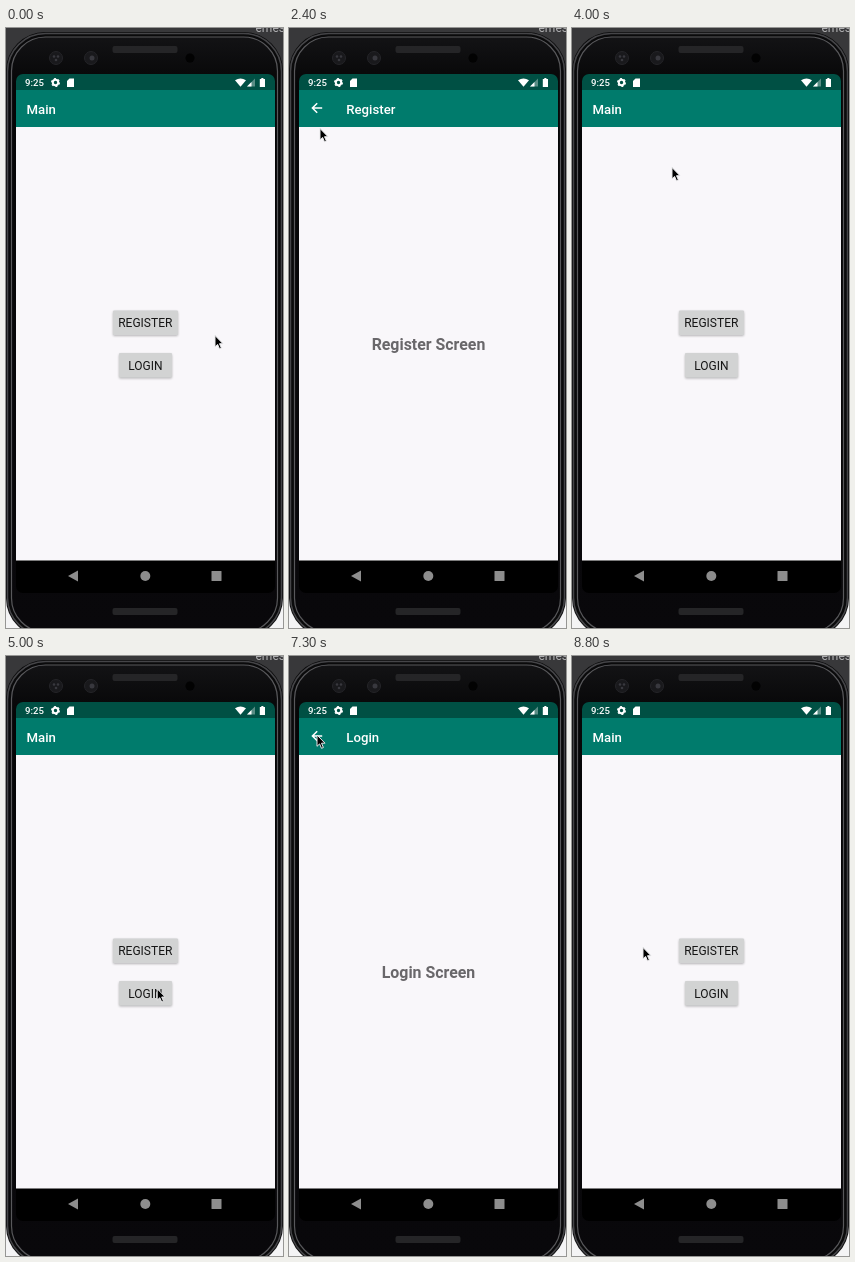
These frames come from a looping animation (277 by 600 pixels, 8900 ms). An HTML page:

```html
<!DOCTYPE html>
<html lang="en">
<head>
<meta charset="utf-8">
<title>Navigation demo</title>
<style>
html, body { margin: 0; width: 100%; height: 100%; overflow: hidden; background: #111; }
svg { display: block; width: 100%; height: 100%; }
text { font-family: Roboto, sans-serif; font-weight: 500; }
.mid { text-anchor: middle; }
.thin { font-weight: 400; }
</style>
</head>
<body>
<svg viewBox="0 0 277 600">
  <defs>
    <linearGradient id="body" x2="0" y2="1">
      <stop offset="0" stop-color="#131315"/>
      <stop offset=".08" stop-color="#060607"/>
      <stop offset="1" stop-color="#09080b"/>
    </linearGradient>
    <filter id="soft" x="-20%" y="-30%" width="140%" height="170%"><feGaussianBlur stdDeviation="1"/></filter>
    <clipPath id="screen"><rect x="10" y="46" width="259" height="519" rx="7"/></clipPath>
    <clipPath id="regClip"><rect x="107" y="282.5" width="65" height="24.5" rx="1"/></clipPath>
    <clipPath id="logClip"><rect x="113" y="325" width="53" height="24.5" rx="1"/></clipPath>
  </defs>

  <!-- Phone shell -->
  <rect width="277" height="600" fill="#f4f4f5"/>
  <rect width="277" height="60" fill="#38383a"/>
  <text class="thin" x="249.500" y="4" font-size="12" fill="#b4b4b6">emes</text>
  <rect x="0" y="4" width="277" height="605" rx="39" fill="#0a0a0b"/>
  <rect x="1.500" y="5.500" width="274" height="602" rx="38" fill="none" stroke="#454548" stroke-width="1.500"/>
  <rect x="5.500" y="9" width="266" height="595" rx="34" fill="url(#body)" stroke="#58585b" stroke-width="1.200"/>
  <g fill="#252527">
    <rect x="106.500" y="18" width="65" height="7" rx="2"/>
    <rect x="106.500" y="580" width="65" height="7" rx="2"/>
  </g>
  <g fill="#19191c" stroke="#242428">
    <circle cx="50" cy="30" r="6.500"/>
    <circle cx="85" cy="30" r="6.500"/>
  </g>
  <g fill="#38383e">
    <circle cx="48" cy="28.500" r="1.300"/><circle cx="52" cy="28.500" r="1.300"/><circle cx="50" cy="32" r="1.300"/>
    <circle cx="86" cy="30" r="2.500"/>
  </g>
  <circle cx="184" cy="30" r="4.500" fill="#020202"/>

  <!-- Screen -->
  <g clip-path="url(#screen)">
    <rect x="10" y="46" width="259" height="519"/>
    <rect x="10" y="98" width="259" height="434.500" fill="#f9f7fa"/>
    <rect x="10" y="62" width="259" height="37" fill="#007b6c"/>
    <rect x="10" y="46" width="259" height="16" fill="#005044"/>
  </g>

  <g fill="#fff">
    <text x="19" y="58" font-size="9.600">9:25</text>
    <circle cx="49.500" cy="54.500" r="2.700" fill="none" stroke="#fff" stroke-width="2"/>
    <circle cx="49.500" cy="54.500" r="3.900" fill="none" stroke="#fff" stroke-width="1.200" stroke-dasharray="2.040"/>
    <path d="M63.500 50.500H68V59H61V53Z"/>
    <path d="M229 52.300Q234.500 48.500 240 52.300L234.500 58.800Z"/>
    <path d="M241 58.500L249 50.500V58.500Z" opacity=".35"/>
    <path d="M241 58.500L245.500 54V58.500Z"/>
    <path d="M255.300 50H257.400V51H259V59H253.800V51H255.300Z"/>
  </g>

  <g fill="#8d8d8d">
    <path d="M62 548L72 542.500V553.500Z"/>
    <circle cx="139.300" cy="548" r="5"/>
    <rect x="205.500" y="543" width="10" height="10" rx=".5"/>
  </g>

  <!-- Pages -->
  <circle id="backRipple" cx="28" cy="80" fill="#fff"/>
  <text id="title" y="86" font-size="13.200" fill="#fff"></text>
  <path id="back" d="M33.200 80H23.800M28.200 75.200L23.400 80L28.200 84.800" fill="none" stroke="#fff" stroke-width="1.500"/>
  <g id="home">
    <rect id="regShadow" x="107" y="283.500" width="65" height="24.500" rx="1.500" filter="url(#soft)"/>
    <rect x="107" y="282.500" width="65" height="24.500" rx="1" fill="#d2d3d3"/>
    <g clip-path="url(#regClip)"><circle id="regRipple" cx="146" cy="299"/></g>
    <text class="mid thin" x="139.300" y="299.200" font-size="12" fill="#161616">REGISTER</text>
    <rect id="logShadow" x="113" y="326" width="53" height="24.500" rx="1.500" filter="url(#soft)"/>
    <rect x="113" y="325" width="53" height="24.500" rx="1" fill="#d2d3d3"/>
    <g clip-path="url(#logClip)"><circle id="logRipple" cx="139" cy="341"/></g>
    <text class="mid thin" x="139.300" y="341.600" font-size="12" fill="#161616">LOGIN</text>
  </g>
  <text id="label" class="mid" x="139.500" y="322" font-size="15.900" fill="#69676a" style="font-weight:700"></text>

  <path id="cursor" d="M0 0V11.300L2.600 8.900L4.500 13.300L6.400 12.500L4.500 8.200H8Z" fill="#000" stroke="#e8e8ea" stroke-width="1" stroke-linejoin="round"/>
</svg>
<script>
const LOOP = 8900, STEP = 100;
const $ = id => document.getElementById(id);
const set = (id, attrs) => { for (const k in attrs) $(id).setAttribute(k, attrs[k]); };

// Pointer stops: time, x, y
const path = [
  [0, 209, 307.5], [200, 209, 307.5], [800, 146, 298],
  [1900, 146, 298], [2400, 31, 100.5], [2500, 23, 88], [2700, 28, 79],
  [3700, 28, 79], [4000, 100, 139.5], [4600, 200, 302], [5100, 139, 340.5],
  [6600, 139, 340.5], [7300, 28, 79],
  [8300, 28, 79], [8800, 71, 291.5], [LOOP, 71, 291.5]
];

// Page starts: time, name
const pages = [[0, 'Main'], [1100, 'Register'], [3600, 'Main'], [5700, 'Login'], [7800, 'Main']];

function pointer(t) {
  const i = path.findIndex(p => p[0] > t);
  const [t0, x0, y0] = path[i - 1], [t1, x1, y1] = path[i];
  const k = (t - t0) / (t1 - t0);
  return [x0 + (x1 - x0) * k, y0 + (y1 - y0) * k];
}

// Ripple growth from 0 to 1 while a press is held
function press(t, start, end) {
  return t < start || t >= end ? 0 : (t - start + STEP) / (end - start);
}

function button(id, k) {
  set(id + 'Ripple', { r: 34 * k, 'fill-opacity': 0.18 });
  set(id + 'Shadow', { 'fill-opacity': k ? 0.48 : 0.28 });
}

function draw(time) {
  const t = Math.floor(time % LOOP / STEP) * STEP;
  const page = pages.filter(p => p[0] <= t).pop()[1];
  const main = page === 'Main';

  $('title').textContent = page;
  $('label').textContent = main ? '' : page + ' Screen';
  set('title', { x: main ? 20.5 : 57.3 });
  set('home', { display: main ? 'inline' : 'none' });
  set('back', { display: main ? 'none' : 'inline' });

  button('reg', press(t, 800, 1100));
  button('log', press(t, 5400, 5700));
  const k = press(t, 3300, 3600) + press(t, 7600, 7800);
  set('backRipple', { r: 20 * k, 'fill-opacity': 0.2 });

  const [x, y] = pointer(t);
  set('cursor', { transform: `translate(${x} ${y})` });
}

const begin = performance.now();
function tick() {
  draw(performance.now() - begin);
  requestAnimationFrame(tick);
}
tick();
</script>
</body>
</html>
```
